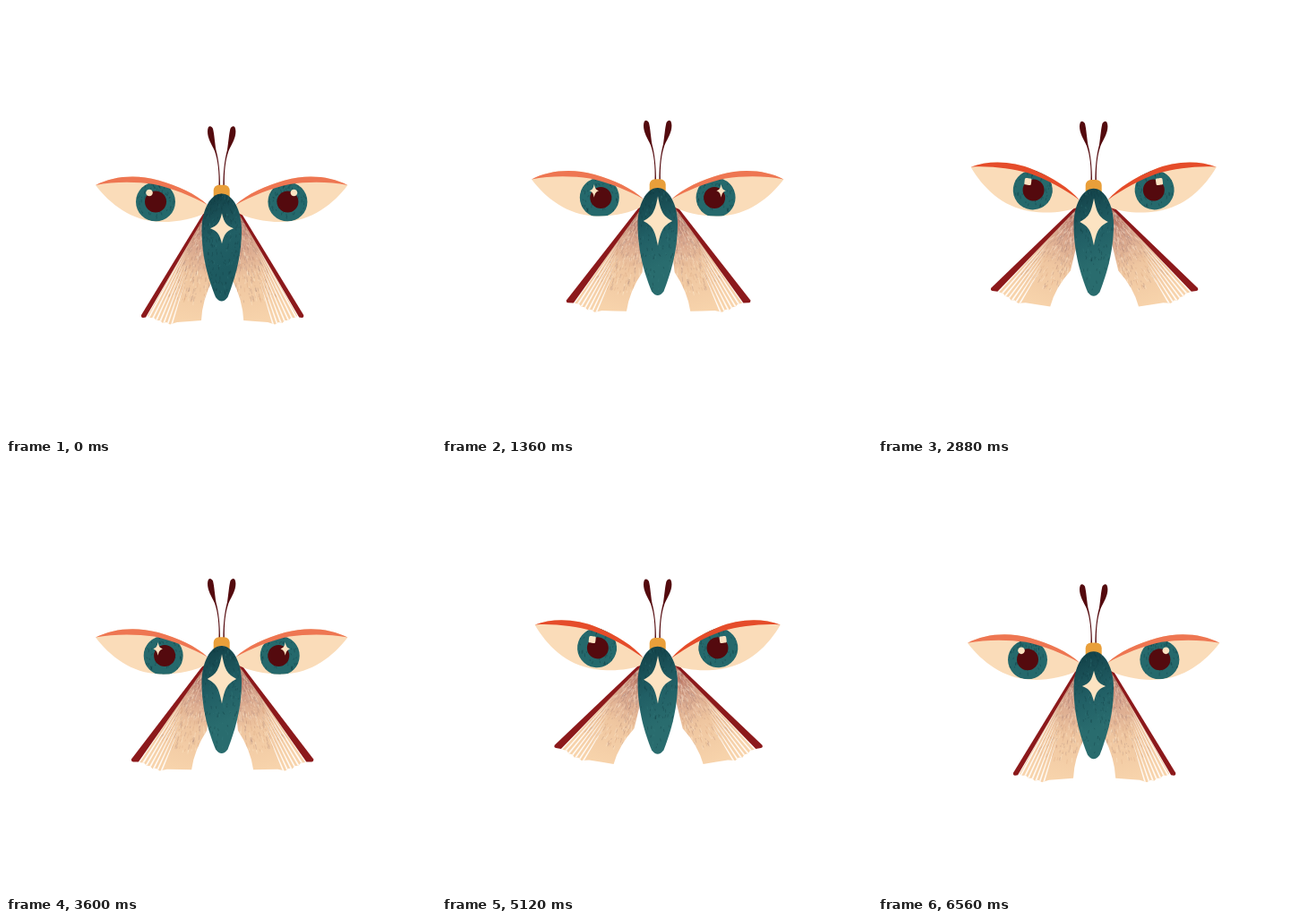
Recreate the animation shown at these times as an HTML page with a canvas. Size 480 by 480 pixels, loop 6640 ms.

```html
<!DOCTYPE html>
<html lang="en">
<head>
<meta charset="utf-8">
<title>Moth</title>
<style>
  html, body { margin: 0; height: 100%; overflow: hidden; background: #fff; }
  canvas { display: block; width: 100vw; height: 100vh; }
</style>
</head>
<body>
<canvas id="stage" width="480" height="480"></canvas>
<script>
const ctx = document.getElementById('stage').getContext('2d');
const STEP = 80, STEPS = 83, FLAP = STEPS / 3;
const AXIS = 240.7, PAGE_AXIS = 241.6;
const TEAL = '#25696c', DARK_TEAL = '#0e363e', CREAM = '#fadcb9', WINE = '#540a0e';

// All shapes are the left half at rest; the right half is mirrored.
const shape = {
  eye: new Path2D('M100 200C119 190 145 187.5 170 194.5C192 200.5 212 210 225 222L224 230C210 238 190 241.5 172 241C140 240 116 221 100 200Z'),
  lid: new Path2D('M100 200C119 190 145 187.5 170 194.5C192 200.5 212 210 225 222C207 212 185 203 165 199C145 196 120 196 100 200Z'),
  pages: new Path2D('M224 228L158 346L161 348L165 348L168 351L172 351L175 354L179 353L183 355.5L191 353L205 352L218 351Q219 328 231 305L232 228Z'),
  body: new Path2D('M240.7 209.5C253 209.5 263 228 263 250C263 282 254 308 247.5 325Q240.7 334 234 325C227 308 218.5 282 218.5 250C218.5 228 228 209.5 240.7 209.5Z'),
  antenna: new Path2D('M237.5 201C238 185 236.5 172 233 162C229 153 225 148 225 140C225 133 229 133 231 137C232.5 143 233 152 234.5 161C237.5 172 239 186 239 201Z')
};

const lerp = (a, b, k) => a + (b - a) * k;
const clamp = x => Math.min(1, Math.max(0, x));
const ease = x => Math.sin(clamp(x) * Math.PI / 2) ** 2;
const bump = (p, peak, end) => p < peak ? ease(p / peak) : 1 - ease((p - peak) / (end - peak));

function random(seed) {
  let s = seed * 7919 + 17;
  return () => (s = (s * 16807) % 2147483647) / 2147483647;
}

function fill(path, color) {
  ctx.fillStyle = color;
  ctx.fill(path);
}

function disc(x, y, r, color) {
  ctx.fillStyle = color;
  ctx.beginPath();
  ctx.arc(x, y, r, 0, 7);
  ctx.fill();
}

function layer(draw) {
  ctx.save();
  draw();
  ctx.restore();
}

function mirrored(axis, draw) {
  for (const side of [1, -1]) layer(() => {
    ctx.translate(axis, 0);
    ctx.scale(side, 1);
    ctx.translate(-axis, 0);
    draw();
  });
}

function turnAbout(x, y, degrees, sx = 1, sy = 1) {
  ctx.translate(x, y);
  ctx.rotate(degrees * Math.PI / 180);
  ctx.scale(sx, sy);
  ctx.translate(-x, -y);
}

// Four tips joined by curves: (.55, 1) a circle, (1.05, 1) a square, (.2, .36) a star.
function gem(x, y, rx, ry, near, far) {
  const at = (u, v) => [x + u * rx, y + v * ry];
  ctx.beginPath();
  ctx.moveTo(...at(0, -1));
  for (let i = 0, u = 0, v = -1; i < 4; i++) {
    const nu = -v, nv = u;
    ctx.bezierCurveTo(
      ...at(u * far + nu * near, v * far + nv * near),
      ...at(u * near + nu * far, v * near + nv * far),
      ...at(nu, nv));
    u = nu; v = nv;
  }
  ctx.fillStyle = '#fce3c2';
  ctx.fill();
}

function grain(seed, count, x, y, w, h, color) {
  const rnd = random(seed);
  ctx.strokeStyle = color;
  ctx.lineWidth = .8;
  ctx.beginPath();
  for (let i = 0; i < count; i++) {
    const px = x + rnd() * w, py = y + rnd() ** 1.6 * h;
    ctx.moveTo(px, py);
    ctx.lineTo(px + rnd() * 2 - 1, py + 1 + rnd() * 3);
  }
  ctx.stroke();
}

function drawPages(spread, lift, seed) {
  const x = 224, y = 228;
  turnAbout(x, y, 13.6 * spread, 1 + .03 * spread, 1 - .05 * spread);
  const tone = ctx.createRadialGradient(x + 8, y, 5, x, y, 125);
  tone.addColorStop(0, '#a9564e');
  tone.addColorStop(.25, '#d3a08a');
  tone.addColorStop(.6, '#efc6a0');
  tone.addColorStop(1, '#f7d3ab');
  fill(shape.pages, tone);

  layer(() => {
    ctx.clip(shape.pages);
    ctx.translate(x, y);
    const rnd = random(seed + 40);
    ctx.lineWidth = .6;
    for (let i = 0; i < 480; i++) {
      const a = lerp(-.1, .46, rnd()), r = 8 + rnd() ** 1.3 * 95, len = 1 + rnd() * 5;
      const dx = -Math.sin(a), dy = Math.cos(a);
      ctx.strokeStyle = ['#8d6d6c60', '#b9775040', '#fff0d880'][i % 3];
      ctx.beginPath();
      ctx.moveTo(dx * r, dy * r);
      ctx.lineTo(dx * (r + len), dy * (r + len));
      ctx.stroke();
    }
    ctx.fillStyle = '#fffaf4';
    for (let i = 0; i < 7; i++) {
      const a = .495 - i * .033, start = 40 + i * 7;
      ctx.beginPath();
      ctx.moveTo(-Math.sin(a) * start, Math.cos(a) * start);
      ctx.lineTo(-Math.sin(a + .007) * 140, Math.cos(a + .007) * 140);
      ctx.lineTo(-Math.sin(a - .007) * 140, Math.cos(a - .007) * 140);
      ctx.fill();
    }
  });

  const edge = lerp(5, 8, lift);
  ctx.fillStyle = '#8c191b';
  ctx.beginPath();
  ctx.moveTo(x - 1.5, y);
  ctx.lineTo(151, 345);
  ctx.quadraticCurveTo(150.5, 348, 153, 348);
  ctx.lineTo(151 + edge, 347.5);
  ctx.lineTo(x + 1.5, y);
  ctx.fill();
}

function drawEye(p, flap, seed) {
  turnAbout(222, 222, 7 * flap);
  const look = bump(p, 16, 27);
  const x = 167 + 9 * look, y = 218.5 + 2 * look * look - 2 * flap;
  fill(shape.eye, CREAM);
  layer(() => {
    ctx.clip(shape.eye);
    disc(x, y, 22, TEAL);
    ctx.clip(new Path2D(`M${x - 22} ${y}a22 22 0 1 0 44 0a22 22 0 1 0-44 0`));
    grain(seed + 9, 90, x - 22, y - 22, 44, 40, DARK_TEAL + '70');
    disc(x + 1.5 * look, y, 12, WINE);
  });
  fill(shape.lid, `rgb(${lerp(238, 229, flap)},${lerp(118, 76, flap)},${lerp(82, 42, flap)})`);

  const square = bump(clamp((p - 3) / 11) * 2, 1, 2);
  const star = p < 18 ? ease((p - 9) / 5) : 1 - ease((p - 19) / 6);
  const near = lerp(lerp(.55, 1.05, square), .2, star);
  const far = lerp(1, .36, star);
  gem(x - 7 + look, y - 10 + 2.5 * look, lerp(3.8, 5.2, star), lerp(3.8, 7.4, star), near, far);
}

function drawBody(lift, seed) {
  ctx.fillStyle = '#e99f3a';
  ctx.beginPath();
  ctx.roundRect(231.7, 199.7, 18, 14, [6, 6, 1, 1]);
  ctx.fill();
  const tone = ctx.createLinearGradient(224, 218, 256, 290);
  tone.addColorStop(0, '#14444b');
  tone.addColorStop(.55, '#215f65');
  tone.addColorStop(1, seed ? '#296c6e' : '#1d5a60');
  fill(shape.body, tone);
  layer(() => {
    ctx.clip(shape.body);
    grain(seed + 3, seed ? 170 : 300, 218, 208, 45, 115, DARK_TEAL + '60');
    grain(seed + 5, 80, 218, 208, 45, 115, '#3a828055');
  });
  gem(241, lerp(248.2, 246.3, lift), lerp(13, 16.3, lift), lerp(17, 28, lift), .2, .36);
}

function draw(now) {
  const step = Math.floor(now / STEP) % STEPS;
  const p = step % FLAP, seed = Math.floor(p / 4);
  const lift = 1 - Math.abs(Math.cos(Math.PI * p / FLAP)) ** 3.6;
  const flap = p < 17.5 ? Math.sin(Math.PI * p / 17.5) ** 2 : 0;
  const spread = bump(p, 10, 22.7);

  ctx.fillStyle = '#fff';
  ctx.fillRect(0, 0, 480, 480);
  layer(() => {
    ctx.translate(0, -6.6 * lift);
    mirrored(PAGE_AXIS, () => drawPages(spread, lift, seed));
    mirrored(AXIS, () => drawEye(p, flap, seed));
    mirrored(AXIS, () => fill(shape.antenna, WINE));
    drawBody(lift, seed);
  });
}

const start = performance.now();
(function tick() {
  draw(performance.now() - start);
  requestAnimationFrame(tick);
})();
</script>
</body>
</html>
```
